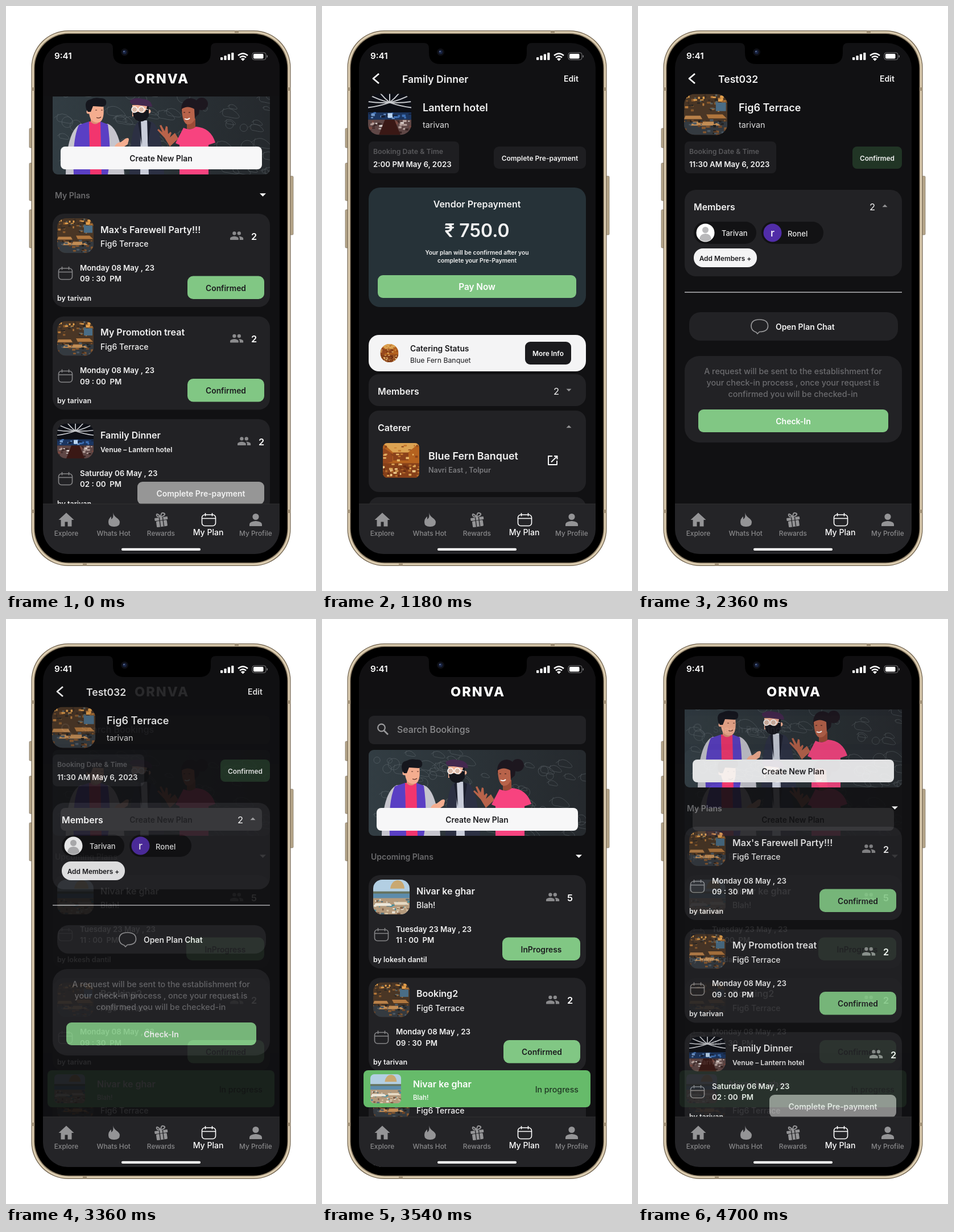
Write an HTML page that moves like this. It is 545x1028 px and loops after 4.72 s.

```html
<!DOCTYPE html>
<html lang="en">
<head>
<meta charset="utf-8">
<title>Plan booking app</title>
<style>
html, body { margin: 0; width: 100%; height: 100%; overflow: hidden; background: #fff; }
svg { display: block; }
text { font-family: Inter, "Open Sans", sans-serif; white-space: pre; }
</style>
</head>
<body>
<svg id="stage" width="545" height="1028" viewBox="0 0 545 1028"></svg>
<script>
const CARD = '#222225', INK = '#1b1b1e', GREEN = '#81c784', GREY = '#949496', PALE = '#f4f4f5';

// Drawing helpers
const rect = (x, y, w, h, r, fill, extra = '') =>
  `<rect x="${x}" y="${y}" width="${w}" height="${h}" rx="${r}" fill="${fill}" ${extra}/>`;
const circle = (x, y, r, fill, extra = '') => `<circle cx="${x}" cy="${y}" r="${r}" fill="${fill}" ${extra}/>`;
const path = (d, fill) => `<path d="${d}" fill="${fill}"/>`;
const line = (d, color, width = 1.5) =>
  `<path d="${d}" fill="none" stroke="${color}" stroke-width="${width}" stroke-linejoin="round"/>`;
const text = (x, y, size, str, fill = '#f2f2f2', weight = 600, anchor = 'start', extra = '') =>
  `<text x="${x}" y="${y}" font-size="${size}" fill="${fill}" font-weight="${weight}" text-anchor="${anchor}" ${extra}>${str}</text>`;
const mid = (x, y, size, str, fill, weight) => text(x, y, size, str, fill, weight, 'middle');
const at = (x, y, body, scale = 1) => `<g transform="translate(${x} ${y}) scale(${scale})">${body}</g>`;
const button = (x, y, w, h, r, fill, size, label, color = INK, weight = 600) =>
  rect(x, y, w, h, r, fill) + mid(x + w / 2, y + h / 2 + size * 0.36 + 0.9, size, label, color, weight);
const times = (n, f) => Array.from({ length: n }, (_, i) => f(i)).join('');

let seed = 7;
const rnd = (a, b) => a + (b - a) * ((seed = seed * 16807 % 2147483647) / 2147483647);
const specks = (n, top, bottom, colors) => times(n, i =>
  rect(rnd(-2, 62), rnd(top, bottom), rnd(2, 6), rnd(1.5, 4), 0.5, colors[i % colors.length]));

// Simplified photos in a 64 x 62 box
const photos = {
  diner: rect(0, 0, 64, 62, 0, '#4a3625') +
    specks(60, 0, 24, ['#2a2622', '#8a5a2c', '#5c625f', '#b5783a', '#3a2c22']) +
    rect(47, 13, 15, 13, 0, '#4a6d86') + rect(0, 42, 64, 20, 0, '#343a40') +
    path('M2 33h22l3 5H0z', '#b98149') + path('M33 31h24l6 6H36z', '#b0763d') + path('M14 42h33l7 6H9z', '#c28d55') +
    specks(45, 38, 61, ['#23211f', '#6d4527', '#4c5964', '#2c3339', '#87582f']) +
    specks(12, 2, 9, ['#e3a04c']),
  hall: rect(0, 0, 64, 62, 0, '#0d0f16') +
    times(9, i => {
      const a = Math.PI - 0.35 + i * (Math.PI + 0.7) / 8, x = 32 + 42 * Math.cos(a), y = 13 + 24 * Math.sin(a);
      return line(`M32 13Q${(32 + x) / 2} ${(13 + y) / 2 + 3} ${x} ${y}`, '#c9cbcf', 1.7);
    }) +
    rect(0, 28, 64, 11, 0, '#1b3560') + specks(22, 27, 36, ['#3d6fb4', '#141c30', '#7197c9']) + rect(29, 29, 7, 7, 1, '#bcd6f2') +
    rect(0, 39, 64, 23, 0, '#5f4746') + specks(40, 39, 58, ['#d9cfcb', '#7a4a42', '#b5a09b', '#3a2524']) +
    path('M25 39h14l9 23H16z', '#3a1815'),
  beach: rect(0, 0, 64, 62, 0, '#b3cfe3') + rect(0, 23, 64, 11, 0, '#5d8cab') +
    rect(0, 21, 64, 4, 0, '#66735f') + rect(0, 33, 64, 29, 0, '#b49a7c') +
    path('M30 16q2-14 13-15q11 1 12 15z', '#c9a871') +
    specks(45, 34, 60, ['#e9e2d4', '#3f8ca0', '#7d5d45', '#d6c3a4', '#56707a']) +
    path('M4 42h25l4 5H1z', '#ece7da') + path('M36 40h22l5 5H38z', '#e5d8c2'),
  banquet: rect(0, 0, 64, 62, 0, '#b5621f') + path('M0 0h64L44 17H18z', '#dca352') +
    rect(18, 17, 27, 14, 0, '#8c421b') + path('M0 8l17 11v14L0 38z', '#96481e') +
    specks(24, 2, 30, ['#c67a30', '#8a4219', '#e8b768']) + rect(0, 36, 64, 26, 0, '#86401a') +
    specks(45, 36, 59, ['#dca656', '#b36b2c', '#6a2d13', '#efca88'])
};
const photo = (name, x, y, w, h, r) =>
  `<svg x="${x}" y="${y}" width="${w}" height="${h}" viewBox="0 0 64 62" preserveAspectRatio="none"><g clip-path="url(#r${r})">${photos[name]}</g></svg>`;

// Icons
const people = (x, y) => at(x, y, circle(8, 8, 3, '#8b8b8d') + circle(16, 8, 3, '#8b8b8d') +
  path('M1 19v-2.5c0-2.3 4.7-3.5 7-3.5s7 1.2 7 3.5V19zM16 13c2.3 0 7 1.2 7 3.5V19h-6v-2.5c0-1.5-.7-2.6-1.8-3.4z', '#8b8b8d'), 1.05);
const calendar = (x, y, color) => at(x, y,
  rect(1, 4, 24, 19.5, 5, 'none', `stroke="${color}" stroke-width="1.6"`) + line('M1 10.5H25M7 1V6.5M19 1V6.5', color, 1.6));
const arrow = (x, y, w, dir, color) => path(`M${x - w} ${y - dir * w / 2}h${2 * w}l${-w} ${dir * w}z`, color);

const doodles = () => `<g opacity=".34">` + times(80, i => {
  const x = rnd(84, 460), y = rnd(232, 378), s = rnd(6, 17);
  return i % 3 ? line(`M${x} ${y}q${s} ${-s} ${2 * s} 0t${-s} ${s / 2}q${-s} 0 ${-s / 2} ${-s}`, '#98a3a8', 0.8)
    : circle(x, y, s * 0.7, 'none', 'stroke="#98a3a8" stroke-width=".8"');
}) + '</g>';

const manInVest =
  path('M105 381q1-76 26-89h48q24 9 29 89z', '#c6c5cd') +
  path('M119 381q-3-60 9-87l18-6 4 93zM164 381l2-93 13 5q7 50 0 88z', '#5a3fc4') +
  path('M146 288h20l2 93h-20z', '#f2356e') + path('M149 276h15v13q-7 7-15 0z', '#dd8d72') +
  path('M145 258h26q3 26-6 31-9 3-16-5-4-8-4-26z', '#f4ad8f') + circle(145, 271, 3.5, '#f4ad8f') +
  path('M141 266q-4-15 8-17 7-4 16-2 13-1 11 10-1 4-6 5l-17-1-4 10h-5z', '#15161d') +
  line('M157 268h3M167 268h3M159 281q5 2 8-1', '#5d3027', 1.2) +
  path('M190 334q3-9 12-10l8-6q6-3 6 2l-2 8-9 6z', '#f4ad8f');

const manInCap =
  path('M217 381q1-84 16-93h22q19 5 23 93z', '#2c3043') + path('M237 286h11l3 95h-15z', '#c9cdda') +
  path('M232 290l5-4 2 44zM249 286l6 4-6 40z', '#1c1f2d') +
  path('M222 259h29v20h-29z', '#f2b095') + circle(251, 270, 3.5, '#f2b095') +
  path('M223 273q9-4 18 0 6-3 7-12h3v18q-7 10-16 9-11-2-12-15z', '#14151c') +
  path('M218 251q9-6 21-3 17 1 18 14l-34-4q-6-2-5-7z', '#44284f') +
  circle(226, 267, 5, '#d9b8a8', 'stroke="#fff" stroke-width="1.5"') + circle(238, 267, 5, '#d9b8a8', 'stroke="#fff" stroke-width="1.5"') +
  line('M243 266l7 1', '#fff', 1.2);

const wavingWoman =
  circle(344, 257, 11, '#1d171f') + path('M308 270q-1-22 17-23 19 2 14 28l-9 8z', '#1d171f') +
  path('M318 283h15v18h-15z', '#9c4b36') + path('M309 266q10-7 22 0l1 18q-5 10-13 9-9-2-10-27z', '#b8634a') +
  line('M314 283q5 3 9-1', '#fff', 2) + line('M312 272h3M321 272h3', '#2b1715', 1.2) +
  path('M303 318l-15 14-9-15-13-14 2-2 7 6-5-12 3-1 6 11 2-9 3 1 1 13 4-4 2 2-3 8 9-8z', '#b8634a') +
  path('M298 326l14-27q13 6 22-2 26 2 34 28l-12 4v52h-51v-52z', '#f7437f');

const banner = () => `<g clip-path="url(#banner)">` + rect(82, 230, 382, 151, 0, 'url(#slate)') + doodles() +
  manInVest + manInCap + wavingWoman +
  rect(96, 332, 354, 40, 8, '#f7f7f8') + mid(272.5, 358, 13.8, 'Create New Plan', INK) + '</g>';

const card = (c, i) => {
  const y = 450 + 180.5 * i, shift = c.pay ? 13 : 0;
  return rect(82, y, 382, 164, 20, CARD) + photo(c.pic, 90, y + 8, 64, 61, 16) +
    text(166, y + 33.5, 16, c.title) + text(166, y + 58, c.pay ? 12.1 : 14, c.place, '#f2f2f2', c.pay ? 600 : 500) +
    people(393 + shift, y + 26) + text(431 + shift, y + 45.5, 16.3, c.count, '#fff') +
    calendar(91.5, y + 92, '#858587') +
    text(130, y + 99.5, 13.3, c.date) + text(130, y + 119, 13.3, c.time) + text(90, y + 152.5, 12.5, 'by ' + c.host) +
    (c.pay ? button(231, y + 110, 223, 40, 9, '#969696', 13.9, 'Complete Pre-payment', '#f2f2f2')
      : button(c.wide ? 317 : 319, y + 109.5, c.wide ? 137 : 135, 40.5, 10, GREEN, 13.8, c.state || 'Confirmed'));
};

const list = (dy, label, cards) => at(0, dy,
  rect(82, 170, 382, 50, 9, CARD) +
  circle(104.5, 191, 6.3, 'none', 'stroke="#9a9a9c" stroke-width="2.2"') + line('M109 196l7 7', '#9a9a9c', 2.6) +
  text(132, 199.5, 15.9, 'Search Bookings', '#8d8d8f', 500) + banner() +
  text(86, 422.5, 14, label, '#6a6a6c') + arrow(451.5, 417, 5.5, 1, '#fff') + cards.map(card).join('')) +
  rect(65, 60, 416, 99, 0, '#111012') +
  text(274, 136, 23.5, 'ORNVA', '#fff', 800, 'middle', 'letter-spacing="2"');

const detail = (title, place, pic, date, boxWidth) =>
  line('M100 119l-10 8.5 10 8.5', '#fff', 2.8) + text(141, 135, 17.6, title) + text(425, 133, 14, 'Edit') +
  photo(pic, 81, 154.5, 76, 72, 16) + text(177, 184.5, 18, place) + text(177, 213.5, 14.4, 'tarivan', '#dedede', 400) +
  rect(82, 238, boxWidth, 56, 8, '#1e1e21') + text(90, 260, 12.3, 'Booking Date &amp; Time', '#58585b') + text(90, 282.5, 13.3, date);

const plan = (title, time, extra) => ({
  title, time, place: 'Fig6 Terrace', pic: 'diner', date: 'Monday 08 May , 23', count: 2, host: 'tarivan', ...extra
});

const screens = [
  list(-85, 'My Plans', [
    plan("Max's Farewell Party!!!", '09 : 30  PM'),
    plan('My Promotion treat', '09 : 00  PM'),
    plan('Family Dinner', '02 : 00  PM', { place: 'Venue – Lantern hotel', pic: 'hall', date: 'Saturday 06 May , 23', pay: true })
  ]),

  detail('Family Dinner', 'Lantern hotel', 'hall', '2:00 PM May 6, 2023', 159) +
  button(302, 247, 162, 39, 9, '#1e1e21', 12, 'Complete Pre-payment', '#f2f2f2') +
  rect(82, 319, 382, 210, 20, '#263238') + mid(272.5, 354, 16, 'Vendor Prepayment') + mid(272.5, 405.5, 32, '₹ 750.0') +
  mid(272.5, 436.5, 10.3, 'Your plan will be confirmed after you') + mid(272.5, 451, 10.3, 'complete your Pre-Payment') +
  button(98, 473, 349, 40, 9, GREEN, 15.3, 'Pay Now', '#fff') +
  rect(82, 578, 382, 64, 18, PALE) + photo('banquet', 102.5, 594, 32, 32, 31) +
  text(155, 606.5, 13.8, 'Catering Status', INK) + text(155, 626.5, 12.3, 'Blue Fern Banquet', INK, 400) +
  button(357, 590, 81, 40, 9, INK, 11.9, 'More Info', '#fff') +
  rect(82, 647, 382, 56, 18, CARD) + text(98, 682.5, 15.9, 'Members') +
  text(407, 682.5, 16.5, '2', '#f2f2f2', 400) + arrow(434, 675, 4.5, 1, GREY) +
  rect(82, 711, 382, 143, 18, CARD) + text(98, 746.5, 16, 'Caterer') + arrow(434, 739, 4.5, -1, GREY) +
  photo('banquet', 107, 768, 64, 61, 8) + text(187, 796.5, 17.9, 'Blue Fern Banquet') +
  text(187, 819.5, 12.5, 'Navri East , Tolpur', '#7b7b7e') +
  line('M405 791h-7v15h15v-7M408 791h5.5v5.5M413 791.5l-10 10', '#fff', 1.9) +
  rect(82, 863, 382, 50, 18, CARD),

  detail('Test032', 'Fig6 Terrace', 'diner', '11:30 AM May 6, 2023', 161) +
  button(377, 247, 87, 39, 8, '#213525', 11.9, 'Confirmed', '#f2f2f2') +
  rect(82, 323, 382, 152, 20, CARD) + text(98, 358.5, 15.9, 'Members') +
  text(407, 358.5, 16.5, '2', '#f2f2f2', 400) + arrow(434, 351, 4.5, -1, GREY) +
  rect(98, 379, 110, 39, 19.5, '#121214') + circle(118.5, 398.5, 16, '#fff') +
  circle(118.5, 393.5, 5.5, '#b9b9bb') + path('M108 410q1-10 10.5-10t10.5 10q-10 7-21 0z', '#b9b9bb') +
  text(147, 404, 12.9, 'Tarivan', '#e8e8e8', 500) +
  rect(217, 379, 109, 39, 19.5, '#121214') + circle(236.5, 398.5, 16, '#512da8') + mid(236.5, 404.5, 18, 'r', '#fff', 500) +
  text(263, 405, 13.2, 'Ronel', '#e8e8e8', 500) +
  button(98, 426, 111, 33, 16, PALE, 11.9, 'Add Members +') +
  line('M82 503H464', '#b9b9bb', 1.3) +
  rect(90, 538, 367, 50, 20, CARD) +
  line('M208 573.5q-9-3-9-11 0-11.5 14.5-11.5t15 11q0 10.5-15 10.5l-3.5 3.5z', '#98989a', 1.7) + text(242, 569, 13.9, 'Open Plan Chat') +
  rect(82, 615, 382, 152, 26, CARD) +
  ['A request will be sent to the establishment for', 'your check-in process , once your request is', 'confirmed you will be checked-in']
    .map((s, i) => mid(272.5, 646.5 + 20 * i, 14.3, s, '#6b6b6e', 500)).join('') +
  button(106, 709, 334, 40, 9, GREEN, 14, 'Check-In', '#fff'),

  list(0, 'Upcoming Plans', [
    plan('Nivar ke ghar', '11 : 00  PM', { place: 'Blah!', pic: 'beach', date: 'Tuesday 23 May , 23', count: 5, host: 'lokesh dantil', state: 'InProgress', wide: true }),
    plan('Booking2', '09 : 30  PM'),
    plan('Booking1', '09 : 00  PM')
  ]) +
  rect(73, 793, 399, 65, 8, '#66bb6a') + photo('beach', 85, 800, 54, 51, 8) +
  text(160, 822.5, 16, 'Nivar ke ghar', '#fff') + text(160, 845, 11.5, 'Blah!', '#fff', 500) +
  text(451, 831.5, 14.2, 'In progress', '#203623', 500, 'end')
];

const phone = [[41, 215, 34], [41, 276, 66], [41, 358, 67], [499, 299, 103]]
  .map(([x, y, h]) => rect(x, y, 6, h, 1.5, '#b7a78b', 'stroke="#786b58" stroke-width=".7"')).join('') +
  rect(44.5, 43, 456, 941, 65, '#6e604c') + rect(45.7, 44.2, 453.6, 938.6, 64, '#dccdb1') +
  rect(49, 47.5, 447, 932, 61, '#8a7b64') + rect(50.5, 49, 444, 929, 60, '#000') +
  rect(402, 43.5, 7, 4.5, 0, '#a29278') + rect(135, 979, 7, 4.5, 0, '#a29278') +
  [[45, 143], [495, 143], [45, 885], [495, 885]].map(([x, y]) => rect(x, y, 5, 6, 0, '#a29278')).join('');

const status = path('M179 65q9 0 9 9v8q0 20 20 20h132q20 0 20-20v-8q0-9 9-9z', '#000') +
  circle(208.5, 81, 6.5, '#0e0f15') + circle(208.5, 81, 3.5, '#182342') + circle(207.5, 80, 1.2, '#66799f') +
  text(85, 92.5, 15.2, '9:41', '#fff') +
  times(4, i => rect(377 + i * 6.4, 90 - i * 2.7, 4.2, 5 + i * 2.7, 1, '#fff')) +
  line('M408 87q8.5-7 17 0M411 90.5q5.5-4.5 11 0', '#fff', 2.5) + path('M412.8 93q3.7-3 7.4 0l-3.7 3.6z', '#fff') +
  rect(433, 82, 24, 12.5, 3.5, 'none', 'stroke="#7a7a7c"') + rect(435, 84, 17.5, 8.5, 1.8, '#fff') + rect(458.5, 86.5, 1.5, 4, 0.7, '#7a7a7c');

const gift = at(273, 903, `<g transform="rotate(-8)">` + rect(-11.5, -4.5, 23, 5, 1, GREY) +
  rect(-9.5, 1.5, 19, 10.5, 1.5, GREY) + line('M0-5q-8-1-7-5t7 5q1-9 6-6t-6 6', GREY, 2) +
  line('M-3-5V12M3-5V12', '#242427', 1.4) + '</g>');
const nav = rect(65, 875, 416, 88, 0, '#242427') + rect(65, 874.5, 416, 1, 0, '#303033') +
  path('M106 890.5l13.5 12.5h-4v11.5h-7v-8h-5v8h-7V903h-4z', GREY) +
  path('M188 890q1 5 6 9 6 4 6 8 0 8-10 8t-10-8q0-6 5-10v5q5-3 3-12z', GREY) + gift +
  calendar(343.5, 890, '#fff') +
  circle(439, 897.5, 5.6, GREY) + path('M428 914v-3q0-5 11-6 11 1 11 6v3z', GREY) +
  ['Explore', 'Whats Hot', 'Rewards', 'My Plan', 'My Profile'].map((s, i) => {
    const x = 106 + 83.2 * i;
    return s === 'My Plan' ? mid(x, 930.3, 14.1, s, '#fff', 500) : mid(x, 931, 11.9, s, '#88888a', 500);
  }).join('') +
  rect(203, 952.7, 139, 4.3, 2, '#fff');

const stage = document.getElementById('stage');
stage.innerHTML = `<defs>
  <linearGradient id="slate"><stop stop-color="#323d43"/><stop offset=".55" stop-color="#2a3136"/><stop offset="1" stop-color="#25292d"/></linearGradient>
  <clipPath id="screen"><rect x="65" y="65" width="416" height="898" rx="44"/></clipPath>
  <clipPath id="banner"><rect x="82" y="230" width="382" height="151" rx="9"/></clipPath>
  ${[8, 16, 31].map(r => `<clipPath id="r${r}"><rect width="64" height="62" rx="${r}"/></clipPath>`).join('')}
  </defs>${phone}<g clip-path="url(#screen)">` +
  screens.map(s => `<g class="view">${rect(65, 65, 416, 898, 0, '#111113')}${s}</g>`).join('') + status + nav + '</g>';

const views = [...document.querySelectorAll('.view')];
const HOLD = 1000, STEP = 20, SPAN = 1180;

// Each screen holds, then the next one dissolves in over ten steps.
function draw(now) {
  const t = now % (SPAN * views.length), k = Math.floor(t / SPAN), p = t % SPAN;
  const mix = p < HOLD ? 0 : (Math.floor((p - HOLD) / STEP) + 1) / 10;
  const last = k === views.length - 1;
  const [low, high, amount] = last ? [0, k, 1 - mix] : [k, k + 1, mix];
  views.forEach((v, i) => {
    const alpha = i === low ? 1 : i === high ? amount : 0;
    v.style.opacity = alpha;
    v.style.display = alpha ? '' : 'none';
  });
}

function tick() {
  draw(performance.now());
  requestAnimationFrame(tick);
}
tick();
</script>
</body>
</html>
```
